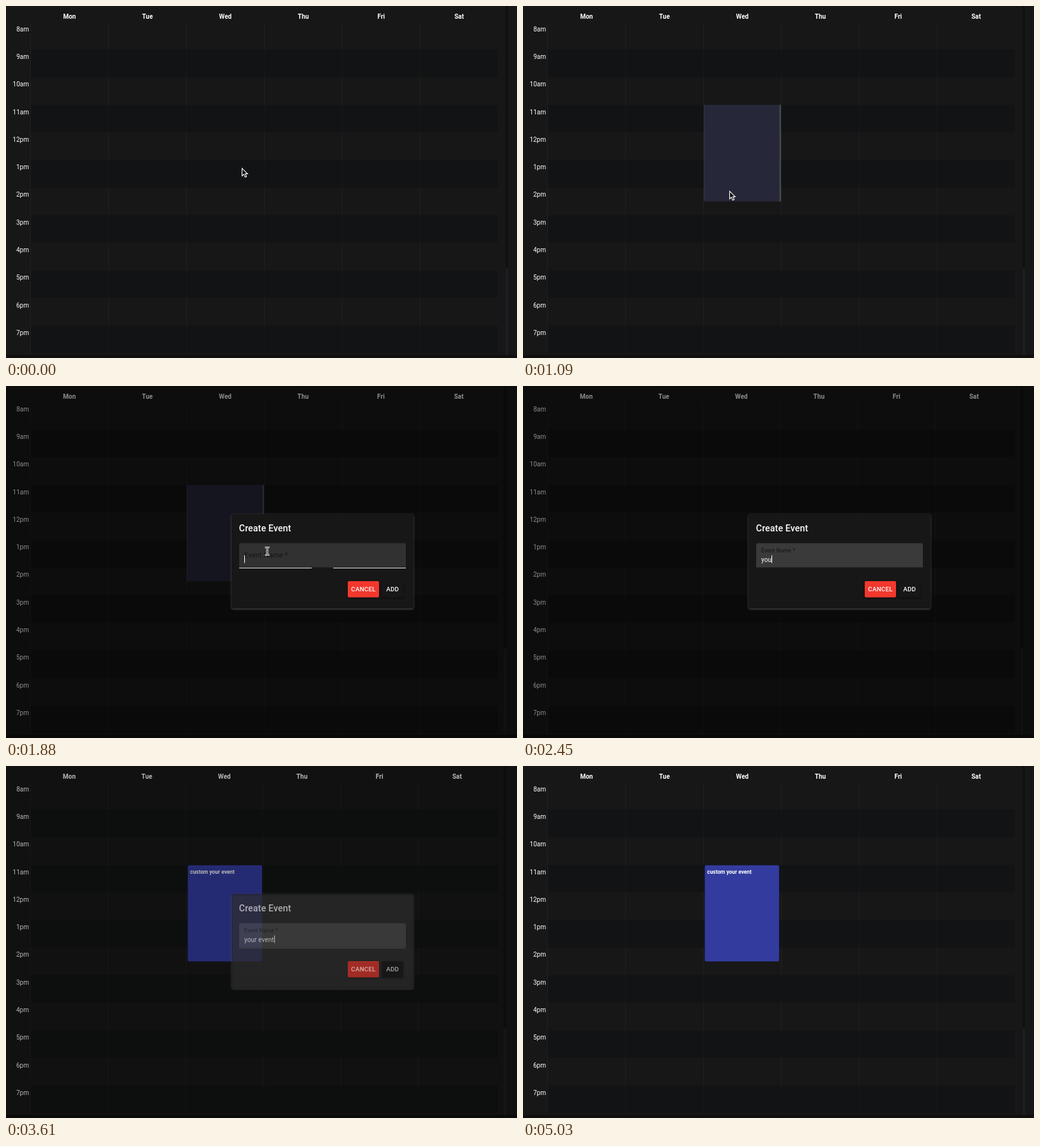
Recreate the animation shown at these times as an HTML page with a canvas. Size 800x552 px, loop 5.7 s.

```html
<!DOCTYPE html>
<html lang="en">
<head>
<meta charset="utf-8">
<title>Weekly calendar</title>
<style>
  html, body { margin: 0; width: 100%; height: 100%; overflow: hidden; background: #171717; }
  canvas { display: block; }
</style>
</head>
<body>
<canvas id="stage" width="800" height="552"></canvas>
<script>
const ctx = document.getElementById('stage').getContext('2d');
const LOOP = 5700, TOP = 25, ROW = 43.3, LEFT = 38.4;
const OPEN = 1180, FOCUS = 1872, RELAYOUT = 1910, CLOSE = 3530, CLOSED = 3725;
const DAYS = ['Mon', 'Tue', 'Wed', 'Thu', 'Fri', 'Sat'];
const HOURS = [8, 9, 10, 11, 12, 1, 2, 3, 4, 5, 6, 7];
const MESSAGE = 'your event';
const KEY_TIMES = [2210, 2330, 2450, 2640, 2790, 2930, 3040, 3130, 3210, 3270];
const POINTER = [[0, 369, 254], [30, 369, 254], [60, 340, 168], [300, 340, 168], [850, 327, 268],
  [970, 323, 290], [1420, 323, 290], [1780, 409, 259]];

const clamp = x => Math.max(0, Math.min(1, x));
const lerp = (a, b, k) => a + (b - a) * k;
const progress = (t, start, end) => clamp((t - start) / (end - start));
const smooth = x => x * x * (3 - 2 * x);
const easeOut = x => 1 - (1 - x) ** 3;

function rect(x, y, w, h, color, radius = 0) {
  ctx.fillStyle = color;
  ctx.beginPath();
  ctx.roundRect(x, y, w, h, radius);
  ctx.fill();
}

function text(str, x, y, size, { weight = 400, color = '#fff', align = 'left', spacing = 0 } = {}) {
  ctx.font = `${weight} ${size}px Roboto, sans-serif`;
  ctx.letterSpacing = spacing + 'px';
  ctx.textAlign = align;
  ctx.fillStyle = color;
  ctx.fillText(str, x, y);
  return ctx.measureText(str).width;
}

function shadowed(color, blur, offset, paint) {
  ctx.save();
  ctx.shadowColor = color;
  ctx.shadowBlur = blur;
  ctx.shadowOffsetY = offset;
  paint();
  ctx.restore();
}

function pointerAt(t) {
  const next = POINTER.findIndex(p => p[0] > t);
  if (next < 0) return POINTER.at(-1).slice(1);
  const [t0, x0, y0] = POINTER[next - 1], [t1, x1, y1] = POINTER[next];
  const k = smooth(progress(t, t0, t1));
  return [lerp(x0, x1, k), lerp(y0, y1, k)];
}

function drawGrid(pitch, barX) {
  rect(0, 0, 800, 552, '#171717');
  for (let i = 0; i < 6; i++) rect(Math.round(LEFT + i * pitch - 0.4), TOP, 1, 522, '#202023');
  for (let i = 1; i < 12; i += 2) rect(39, TOP + i * ROW, 731, ROW, 'rgba(15,17,19,.55)');
  rect(0, 547, 800, 5, '#110f10');
  rect(barX, 0, 4, 411, '#111112');
  rect(barX, 411, 4, 136, '#1d1d26');
  DAYS.forEach((day, i) =>
    text(day, LEFT + (i + 0.5) * pitch, 19.5, 10, { weight: 700, align: 'center' }));
  HOURS.forEach((hour, i) =>
    text(hour + (i < 4 ? 'am' : 'pm'), 36, 39.6 + i * ROW, 10, { align: 'right' }));
}

function drawSelection(t) {
  const start = TOP + 3 * ROW, half = ROW / 2;
  const slots = Math.floor((pointerAt(Math.min(t, 1100))[1] - start) / half) + 1;
  const h = slots * half;
  rect(283, start, 120, h, '#262738');
  rect(283, start, 1.5, h, '#303138');
  rect(401.5, start, 2.5, h, '#454947');
}

function drawEvent() {
  rect(284.5, 155.5, 116.5, 151, '#29318a', 2);
  rect(285, 156, 115.5, 150, '#333c9e', 2);
  text('custom ' + MESSAGE, 288.3, 168.8, 8.4, { weight: 700 });
}

function drawField(t) {
  const focus = easeOut(progress(t, FOCUS, FOCUS + 200));
  rect(365, 246.5, 261, 39, `rgba(255,255,255,${lerp(0.11, 0.15, focus)})`, [2.5, 2.5, 0, 0]);
  rect(365, 285, 261, 1, '#ddd');
  const line = 261 * focus;
  rect(495.5 - line / 2, 284.5, line, 1.5, '#161616');

  ctx.save();
  ctx.translate(373, lerp(270, 261.2, focus));
  ctx.scale(1 - focus / 4, 1 - focus / 4);
  text('Event Name *', 0, 0, 11.5, { color: '#151515', spacing: 0.1 });
  ctx.restore();

  const typed = MESSAGE.slice(0, KEY_TIMES.filter(k => k <= t).length);
  const width = text(typed, 373, 275.5, 10, { spacing: 0.07 });
  if (t >= FOCUS - 10) rect(373 + Math.round(width), 265.5, 1, 12, '#fff');
}

function drawDialog(t, alpha) {
  ctx.globalAlpha = alpha;
  rect(0, 0, 800, 552, 'rgba(0,0,0,.45)');
  shadowed('rgba(255,255,255,.3)', 3, 1, () => rect(353, 200.5, 285, 148.5, '#171717', 3));
  text('Create Event', 364.8, 228.3, 14.2, { weight: 500, spacing: 0.1 });
  drawField(t);
  const label = { weight: 500, align: 'center', spacing: 0.2 };
  shadowed('rgba(0,0,0,.6)', 3, 1, () => {
    rect(535, 306, 49, 25.5, '#f2382d', 2);
    rect(588, 306, 34, 25.5, '#171717', 2);
  });
  text('CANCEL', 559.5, 322.4, 9.8, label);
  text('ADD', 605.2, 322.4, 9.8, label);
  ctx.globalAlpha = 1;
}

function drawPointer(t) {
  const [x, y] = pointerAt(t);
  const overField = t > OPEN && x > 365 && y > 246 && y < 286;
  ctx.save();
  ctx.translate(x, y);
  const path = new Path2D(overField
    ? 'M-3.5-6Q0-6 0-4Q0-6 3.5-6M0-4V4M-3.5 6Q0 6 0 4Q0 6 3.5 6M-2 1H2'
    : 'M.5.5V12.5L3.3 9.9L5.4 14.6L7.6 13.6L5.5 9.1H9.3Z');
  ctx.strokeStyle = '#fff';
  if (overField) {
    ctx.lineWidth = 2.6;
    ctx.stroke(path);
    ctx.strokeStyle = '#222';
    ctx.lineWidth = 0.9;
  } else {
    ctx.fillStyle = '#101010';
    ctx.fill(path);
    ctx.lineWidth = 1.1;
  }
  ctx.stroke(path);
  ctx.restore();
}

function draw(t) {
  const open = t >= OPEN && t < CLOSED;
  const pitch = !open ? 122 : t < RELAYOUT ? 121.9 : 121.4;
  drawGrid(pitch, open ? 779 : 782);
  if (t >= 300 && t < RELAYOUT) drawSelection(t);
  if (t >= CLOSE) drawEvent();
  if (open) drawDialog(t, smooth(progress(t, OPEN, OPEN + 225)) * (1 - smooth(progress(t, CLOSE, CLOSED))));
  if (t < KEY_TIMES[0]) drawPointer(t);
}

function tick() {
  draw(performance.now() % LOOP);
  requestAnimationFrame(tick);
}
tick();
</script>
</body>
</html>
```
